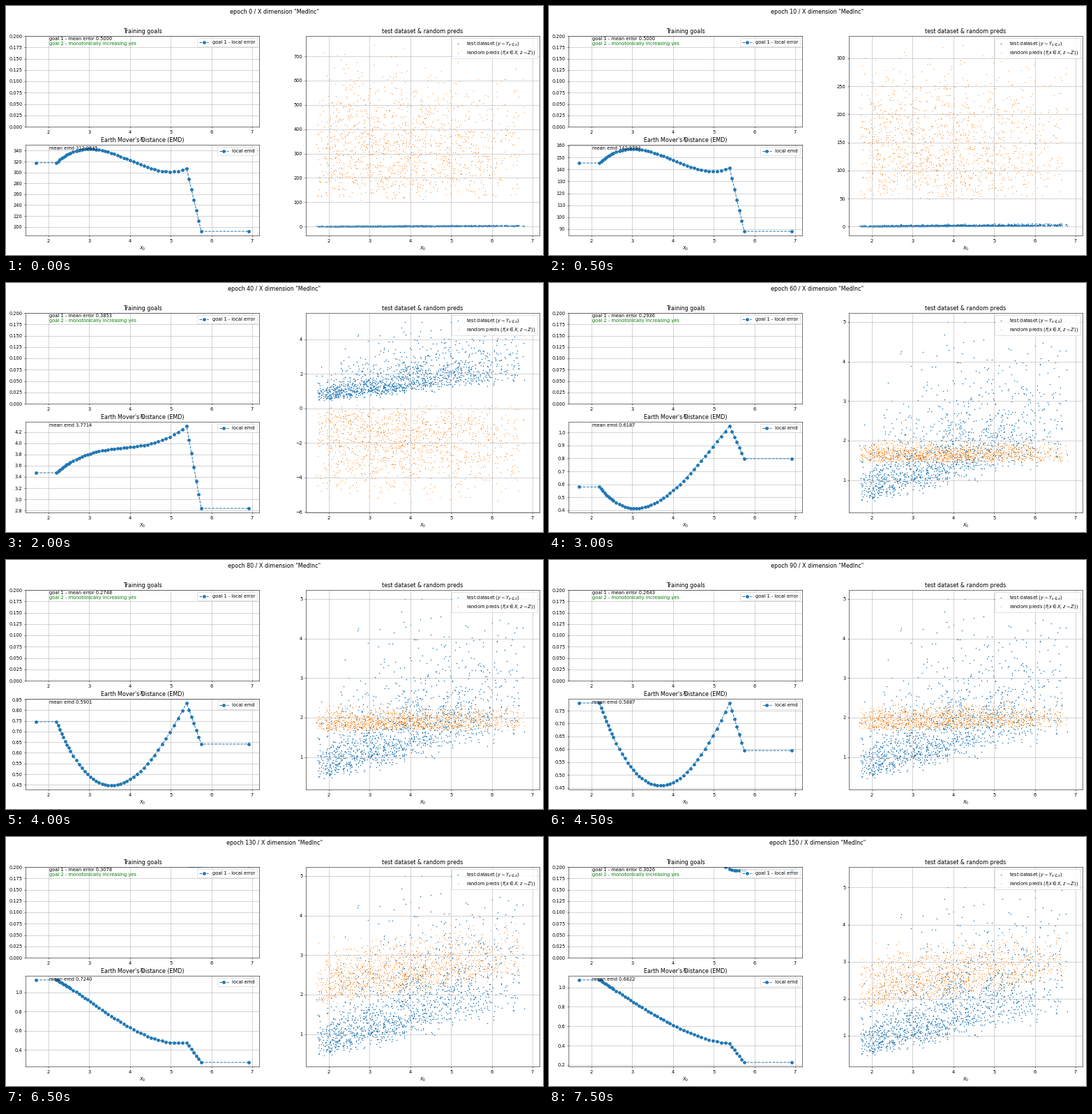
Animation of 770 by 357 pixels, one loop 8000 ms. Source, as a matplotlib script:

```python
import numpy as np
import matplotlib.pyplot as plt
from matplotlib.animation import FuncAnimation

W, H = 770, 357
DPI = W / 16
COUNT = 1400

# key epochs; every value below is blended between them
KEYS = [0, 30, 60, 80, 110, 130, 150]
MEAN_ERROR = [.5, .5, .2936, .2748, .2433, .3078, .3026]
MEAN_EMD = [312.0635, 7.7122, .6187, .5901, .5860, .7240, .6822]
LEVEL = [314, -5.7, 1.65, 1.88, 1.96, 2.25, 2.28]
SPREAD = [123.5, -2.65, .12, .13, .15, .33, .34]

# local emd: a cubic through four anchors, then a straight run to a fifth value
ANCHORS = [2.2, 3.1, 4.2, 5.39]
EMD = np.array([
    (318, 343, 316, 307, 191.7),
    (7.09, 8.1, 8.12, 8.38, 5.39),
    (.58, .415, .61, 1.05, .798),
    (.746, .477, .505, .834, .641),
    (.848, .565, .465, .673, .503),
    (1.13, .88, .587, .478, .27),
    (1.077, .83, .57, .42, .227),
])

u = np.linspace(0, 1, 36)[1:-1]
BIN_X = np.concatenate([
    [1.696],
    np.linspace(2.197, 2.539, 9),
    2.539 + 2.851 * (.85 * u + .15 * u ** 3),
    np.linspace(5.39, 5.75, 7),
    [6.91],
])

rng = np.random.default_rng(4)
data_x = 1.7 + 5.2 * rng.beta(1.25, 1.7, COUNT)
n = rng.standard_normal(COUNT)
data_y = (.1 + .42 * data_x) * np.exp(.36 * (n + .12 * (n ** 2 - 1)))
data_y = np.clip(data_y, .41, 5)


def eased(epoch):
    """Slow down towards each of the first key epochs."""
    if epoch >= 60:
        return epoch
    f = epoch % 30 / 30
    return epoch // 30 * 30 + 30 * f * (2 - f)


def emd_curve(points):
    *anchors, end = points
    fit = np.polyfit(ANCHORS, anchors, 3)
    body = np.polyval(fit, np.clip(BIN_X, ANCHORS[0], ANCHORS[-1]))
    return body + (end - anchors[-1]) * np.clip((BIN_X - 5.39) / .36, 0, 1)


def noise(seed):
    """Right-skewed noise, the same for each seed."""
    b = np.random.default_rng(seed).beta(1.8, 3.6, COUNT)
    return np.interp(b, (b.min(), b.max()), (-1.65, 3.5))


def padded(lo, hi):
    pad = .05 * (hi - lo)
    return lo - pad, hi + pad


def add_axes(left, top, height, title):
    ax = fig.add_axes([left / W, 1 - (top + height) / H, 335 / W, height / H])
    ax.set_title(title)
    ax.set_xlabel("$X_0$")
    ax.set_xlim(1.436, 7.172)
    ax.grid(True)
    return ax


def note(ax, y, text="", **style):
    return ax.text(.1, y, text, transform=ax.transAxes, **style)


fig = plt.figure(figsize=(W / DPI, H / DPI), dpi=DPI)
heading = fig.text(.5, 1 - 11 / H, "", fontsize=12, ha="center")

goal_ax = add_axes(28, 43, 130, "Training goals")
emd_ax = add_axes(28, 199, 130, "Earth Mover's Distance (EMD)")
data_ax = add_axes(430, 43, 286, "test dataset & random preds")

goal_line, = goal_ax.plot(BIN_X, BIN_X, "--o", label="goal 1 - local error")
goal_ax.set_ylim(0, .2)
goal_text = note(goal_ax, .95)
note(goal_ax, .9, "goal 2 - monotonically increasing yes", color="green")

emd_line, = emd_ax.plot(BIN_X, BIN_X, "--o", label="local emd")
emd_text = note(emd_ax, .95)

data_ax.scatter(data_x, data_y, s=5, linewidths=0,
                label=r"test dataset ($y \sim Y_{x \in x}$)")
pred_dots = data_ax.scatter(data_x, data_y, s=2, linewidths=0,
                            label=r"random preds ($f(x \in X, z \sim Z)$)")

for ax in (goal_ax, emd_ax, data_ax):
    ax.legend(loc="upper right")


def update(step):
    epoch = step * 10
    t = eased(epoch)

    def at(values):
        return np.interp(t, KEYS, values)

    heading.set_text(f'epoch {epoch} / X dimension "MedInc"')
    goal_text.set_text(f"goal 1 - mean error {at(MEAN_ERROR):.4f}")
    emd_text.set_text(f"mean emd {at(MEAN_EMD):.4f}")

    floor = .193 + .000475 * (150 - epoch)
    goal_line.set_ydata(floor + .045 * np.maximum(0, 5.455 - BIN_X))

    emd = emd_curve([at(column) for column in EMD.T])
    emd_line.set_ydata(emd)
    emd_ax.set_ylim(padded(emd.min(), emd.max()))

    slope = .145 * np.clip((epoch - 70) / 60, 0, 1) ** 2
    preds = at(LEVEL) + slope * (data_x - 1.7) + at(SPREAD) * noise(step)
    pred_dots.set_offsets(np.column_stack([data_x, preds]))
    top = 5 + .31 * np.clip((epoch - 130) / 20, 0, 1)
    data_ax.set_ylim(padded(min(.41, preds.min()), max(top, preds.max())))
    return []


anim = FuncAnimation(fig, update, frames=16, interval=500, repeat=True,
                     repeat_delay=0, blit=False)
plt.show()
```
